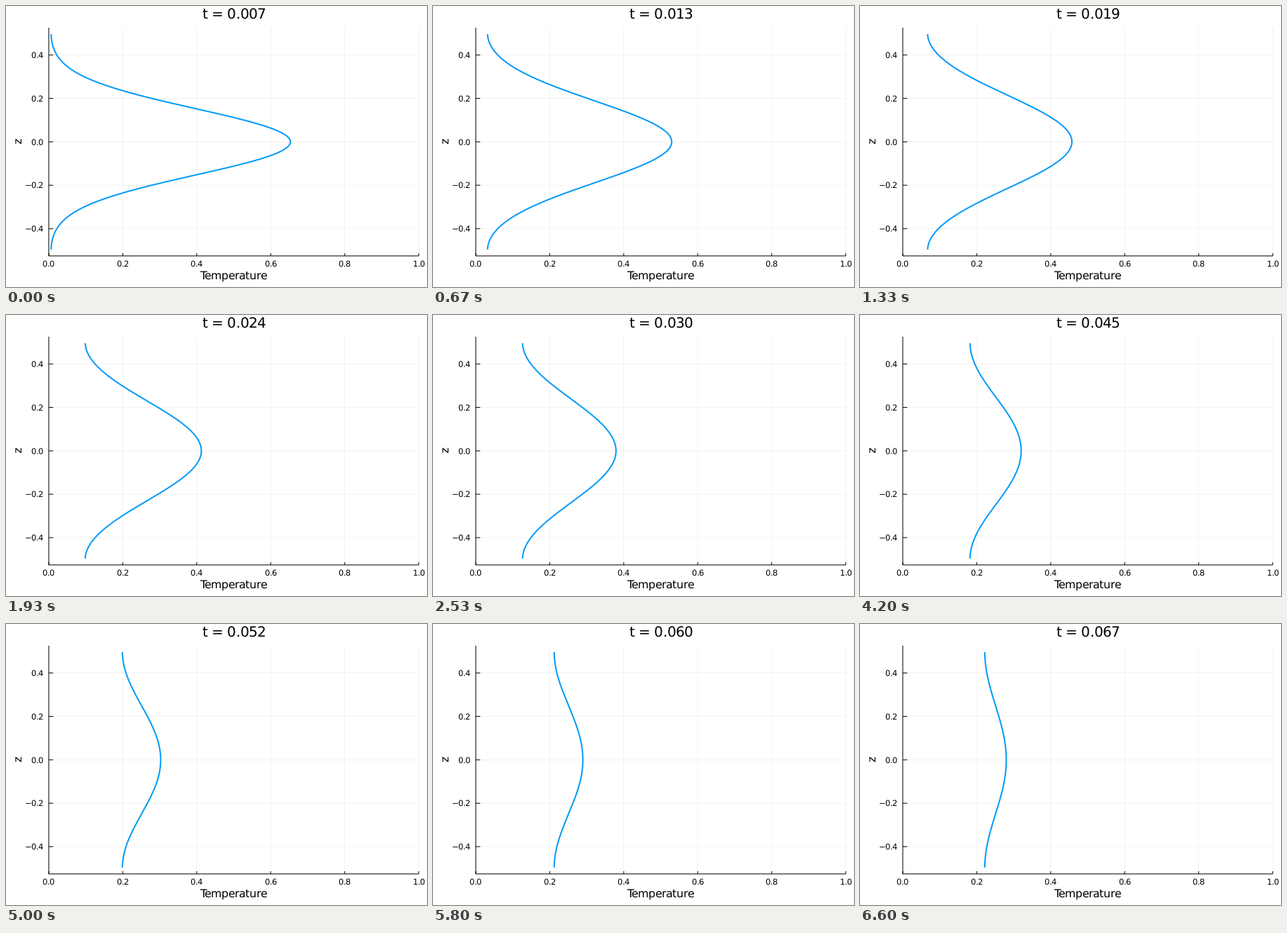
Recreate the animation shown at these times as a matplotlib script. Size 600x400 px, loop 6.67 s.

```python
import numpy as np
import matplotlib.pyplot as plt
from matplotlib.animation import FuncAnimation
from matplotlib.patches import PathPatch
from matplotlib.path import Path
from matplotlib.textpath import TextPath, text_to_path

W, H, DPI = 600, 400, 100
PX = 72 / DPI                      # one pixel in points
STEPS, SUB, LOOP_MS = 100, 4, 6670  # each step is held for SUB ticks

LEFT, RIGHT, TOP, BOTTOM = 60.97, 588.19, 30.87, 355.8
CELLS, WIDTH = 128, 0.1
DT = 0.1 / CELLS**2                # time step of the diffusion solver

plt.rcParams["font.family"] = "DejaVu Sans"

z = (np.arange(CELLS) + 0.5) / CELLS - 0.5
X_MID, Y_MID = (LEFT + RIGHT) / 2, (TOP + BOTTOM) / 2
Y_UNIT = (BOTTOM - TOP) / (1.06 * np.ptp(z))   # 3 % padding on each side


def to_x(temp):
    return LEFT + temp * (RIGHT - LEFT)


def to_y(height):
    return Y_MID - height * Y_UNIT


def time_at(step):
    return (1100 + 100 * step) * DT


def temperature(t):
    """Spreading Gaussian between insulated walls, by mirror images."""
    var = WIDTH**2 + 2 * t
    images = sum(np.exp(-(z - k) ** 2 / (2 * var)) for k in range(-3, 4))
    return WIDTH / np.sqrt(var) * images


fig = plt.figure(figsize=(W / DPI, H / DPI), dpi=DPI, facecolor="white")
ax = fig.add_axes([0, 0, 1, 1])
ax.set(xlim=(0, W), ylim=(H, 0))
ax.axis("off")
font = ax.title.get_fontproperties().copy()


def segment(x0, y0, x1, y1, width=1.0, **style):
    ax.plot([x0, x1], [y0, y1], color="black", lw=width * PX, snap=False,
            solid_capstyle="butt", **style)


def width_of(text):
    return text_to_path.get_text_width_height_descent(text, font, False)[0]


def advance(a, b):
    """Kerned advance from a to b, cut to whole pixels."""
    return np.floor(width_of(f"H{a}{b}H") - width_of(f"H{b}H"))


def text_path(x, y, text, size, align=0.5, upright=False):
    """Outline of a line of text; align is 0.5 for centred, 1 for right."""
    font.set_size(size)
    pen, glyphs = 0, []
    for a, b in zip(text, text[1:] + "H"):
        if a != " ":
            glyphs.append(TextPath((pen, 0), a, prop=font))
        pen += advance(a, b)
    path = Path.make_compound_path(*glyphs)
    u, v = path.vertices.T
    if upright:
        verts = np.column_stack([x - v, np.round(y + align * pen) - u])
    else:
        verts = np.column_stack([np.round(x - align * pen) + u, y - v])
    return Path(verts, path.codes)


def label(*args, **style):
    patch = PathPatch(text_path(*args, **style), fc="black", lw=0)
    return ax.add_patch(patch)


for v in np.linspace(0, 1, 6):
    x = to_x(v)
    segment(x, TOP, x, BOTTOM, 0.5, alpha=0.1)
    segment(x, BOTTOM, x, BOTTOM - 0.012 * (BOTTOM - TOP))
    label(x, 371, f"{v:.1f}", 11.5)

for v in (-0.4, -0.2, 0.0, 0.2, 0.4):
    y = to_y(v)
    segment(LEFT, y, RIGHT, y, 0.5, alpha=0.1)
    segment(LEFT, y, LEFT + 0.012 * (RIGHT - LEFT), y)
    label(53, np.round(y + 4.3), f"{v:.1f}".replace("-", "\u2212"), 11.5,
          align=1)

segment(LEFT, TOP, LEFT, BOTTOM)
segment(LEFT, BOTTOM, RIGHT, BOTTOM)

label(X_MID, 389, "Temperature", 15.8)
label(22, Y_MID, "z", 15.8, upright=True)


def title_path(t):
    return text_path(X_MID, 18, f"t = {t:.3f}", 20.1)


title = ax.add_patch(PathPatch(title_path(time_at(0)), fc="black", lw=0))
curve, = ax.plot([], [], color="#009AF9", lw=2 * PX, solid_capstyle="butt",
                 zorder=3)


def update(tick):
    # switch one tick early, so rounded playback times show the new step
    t = time_at(min((tick + 1) // SUB, STEPS - 1))
    curve.set_data(to_x(temperature(t)), to_y(z))
    title.set_path(title_path(t))
    return curve, title


anim = FuncAnimation(fig, update, frames=STEPS * SUB,
                     interval=LOOP_MS / (STEPS * SUB),
                     repeat=True, repeat_delay=0)
plt.show()
```
